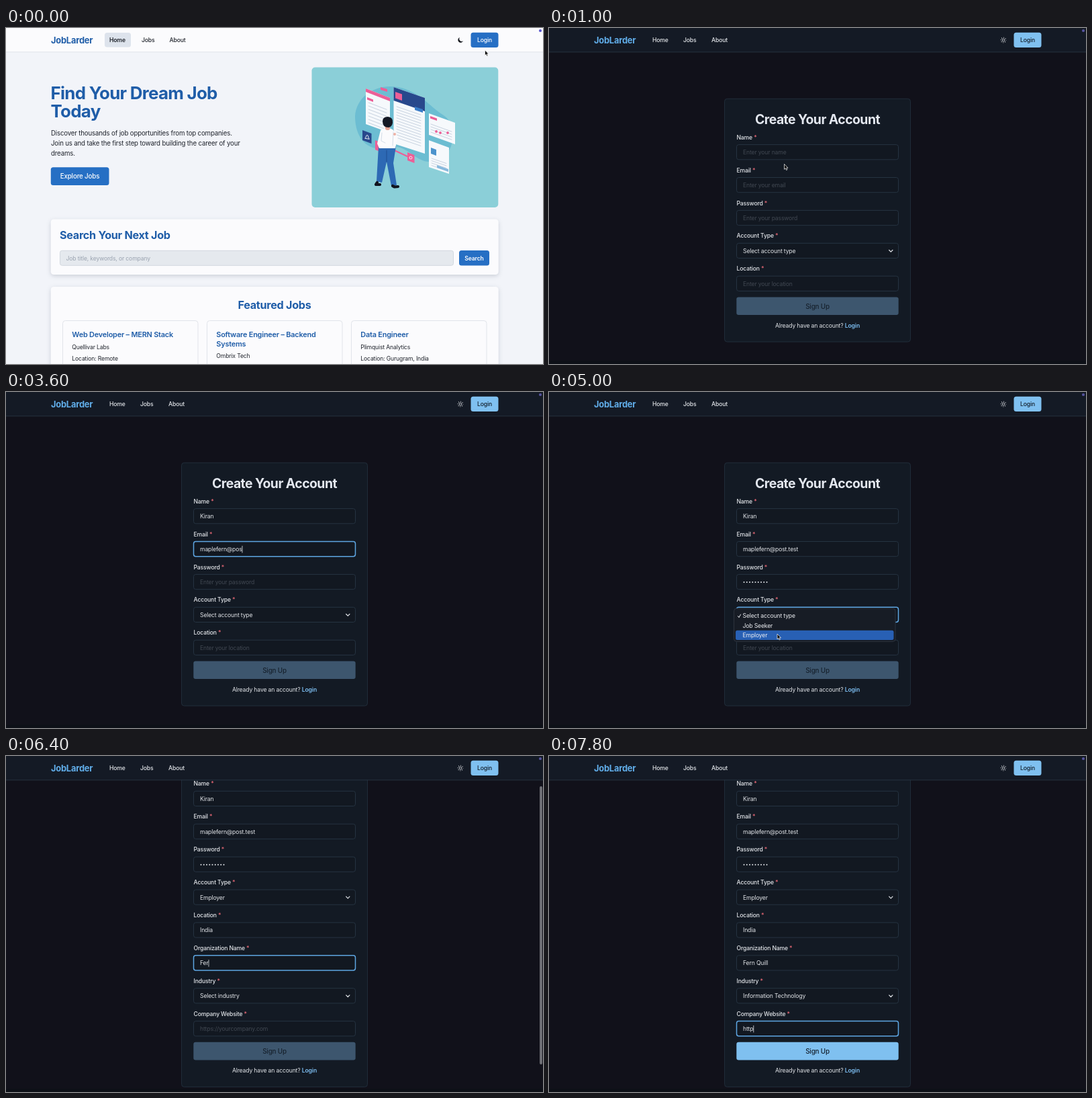
Recreate the animation shown at these times as an HTML page. Size 800 px wide and 500 px high, loop 8000 ms.

```html
<!DOCTYPE html>
<html lang="en">
<head>
<meta charset="utf-8">
<title>Job board sign-up</title>
<style>
html, body { margin: 0; width: 100%; height: 100%; overflow: hidden; }
svg { display: block; width: 800px; height: 500px; font-family: Inter, "Open Sans", sans-serif; }
.light {
  --bg: #f2f4f9; --panel: #fbfbfd; --line: #e1e4ea; --ink: #20242c; --title: #1f2430; --hint: #767b84;
  --brand: #1f5da8; --link: #1f6bbd; --button: #266fc4; --on: #fff; --off: #a3c1e2; --off-ink: #f5f8fc;
  --star: #dc3f5b; --field: #fbfbfd; --dot: #5a58d0;
}
.dark {
  --bg: #11111a; --panel: #131a24; --line: #253341; --ink: #e2e5e9; --title: #e4e8f0; --hint: #414852;
  --brand: #61aeea; --link: #7cbdf0; --button: #7fc0f0; --on: #14202d; --off: #3d566e; --off-ink: #17222e;
  --star: #ef6b78; --field: #121821; --dot: #57549f;
}
.light .raised { filter: drop-shadow(0 2px 3px #20304a30); }
</style>
</head>
<body>
<svg id="stage" viewBox="0 0 800 500"></svg>
<script>
const stage = document.getElementById('stage');
const LOOP = 8000, STEP = 200, PITCH = 48.9;
const BRAND = 'JobLarder';

const rect = (x, y, w, h, fill, r = 0, extra = '') =>
  `<rect x="${x}" y="${y}" width="${w}" height="${h}" rx="${r}" fill="${fill}" ${extra}/>`;
const poly = (points, fill, extra = '') => `<polygon points="${points}" fill="${fill}" ${extra}/>`;
const stroke = (d, color, width = 1) =>
  `<path d="${d}" fill="none" stroke="${color}" stroke-width="${width}" stroke-linecap="round" stroke-linejoin="round"/>`;

// y is the middle of the capital letters
function text(x, y, content, { size = 8.63, weight = 400, fill = 'var(--ink)', anchor = 'start', extra = '' } = {}) {
  const spacing = size * (size > 18 ? -0.028 : -0.018);
  return `<text x="${x}" y="${y + size * 0.364}" font-size="${size}" font-weight="${weight}" fill="${fill}"
    letter-spacing="${spacing}" text-anchor="${anchor}" ${extra}>${content}</text>`;
}

const typed = (word, start, end, t) =>
  word.slice(0, Math.round(word.length * Math.min(1, Math.max(0, (t - start) / (end - start)))));

function nav(home, dark) {
  const items = home ? [['Home', 154], ['Jobs', 202], ['About', 243.5]] : [['Home', 154], ['Jobs', 200], ['About', 242]];
  const icon = dark
    ? `<circle cx="677" cy="18" r="1.8" fill="none" stroke="var(--ink)" stroke-width=".8"/>
       <circle cx="677" cy="18" r="3.7" fill="none" stroke="var(--ink)" stroke-width="1.3" stroke-dasharray=".9 2.006" stroke-dashoffset=".45"/>`
    : '<path d="M676 14a4 4 0 1 0 5 5.3a3.7 3.7 0 0 1-5-5.3z" fill="#11141a"/>';
  return rect(0, 0, 800, 35.5, dark ? '#141a25' : 'var(--panel)') + rect(0, 35.3, 800, 1, 'var(--line)')
    + text(67, 18, BRAND, { size: 12.9, weight: 700, fill: 'var(--brand)' })
    + (home ? rect(147, 7, 39, 21.5, '#dde3ec', 3.5) : '')
    + items.map(([label, x], i) => text(x, 18, label, { weight: home && !i ? 600 : 500 })).join('')
    + icon + rect(692.5, 6.8, 41, 22.2, 'var(--button)', 3.5)
    + text(713, 18, 'Login', { weight: 500, fill: 'var(--on)', anchor: 'middle' })
    + '<circle cx="796" cy="4" r="2.1" fill="var(--dot)"/>';
}

function ruled(x, y, width, slope, count, gap, color = '#bcc8d8') {
  let d = '';
  for (let i = 0; i < count; i++) d += `M${x} ${y + i * gap}l${width} ${width * slope}`;
  return stroke(d, color, 0.8);
}

function illustration() {
  const pink = '#ec5f97', navy = '#28488c', white = '#f6f9fc';
  return rect(455.5, 58.5, 277.8, 208.5, '#8bcfd8', 5)
    + '<path d="M520 131C522 101 552 82 584 88S630 116 652 130S670 190 640 198S600 170 570 178S520 165 520 131z" fill="#6cbdd2"/>'
    + poly('536,90 572,104 572,156 536,143', white) + poly('536,90 572,104 572,109 536,95', pink)
    + ruled(540, 111, 27, 0.38, 7, 5) + poly('538,103 547,106.500 547,110 538,106.500', pink)
    + poly('558,88 568,91 568,95 558,92', pink)
    + poly('577.500,88 624,104 624,187 577.500,172', white) + poly('577.500,88 624,104 624,124 577.500,108', navy)
    + poly('580,95 590,98.500 590,108 580,104.500', pink) + poly('609,117 621,121 621,126 609,122', '#397cc8')
    + ruled(582, 117, 36, 0.34, 12, 4.2)
    + poly('630,127 669,141 669,173 630,159', white) + poly('632,131 642,134.500 642,138 632,134.500', pink)
    + ruled(633, 143, 31, 0.36, 4, 4)
    + [[641, 154], [647, 156], [658, 156]].map(([x, y]) => `<circle cx="${x}" cy="${y}" r="1.9" fill="${pink}"/>`).join('')
    + poly('630,167 660,178 660,217 630,207', white) + poly('633,178 641,181 641,190 633,187', '#4c93cc')
    + ruled(634, 194, 22, 0.34, 4, 3.5) + poly('642,204 659,210 659,214 642,208', '#87b9dd')
    + poly('531,152 544.500,157 544.500,172 531,167', navy)
    + stroke('M535 164q1.500-1 1.500-3q1.500-3.500 3 0q0 2 1.500 4z', '#fff', 0.9)
    + stroke('M570 178l30 14', pink, 2) + poly('598,185 608.500,189 608.500,201 598,197', pink)
    + `<circle cx="603" cy="193" r="2" fill="none" stroke="#fff" stroke-width=".8"/>`
    + poly('550,167 557,170 557,184 550,181', pink)
    + poly('555,176 581,176 577,201 582,234 574,235 567,199 560,230 552,228', '#2d69b4')
    + stroke('M567 182v17', '#204f91', 1)
    + '<path d="M558 152Q567 146 576 151L584 162L581 174L580 179H556L553 172z" fill="#fbfbfd"/>'
    + stroke('M560 156l-1 12l6 3M577 155l-1 20', '#c9d5e3', 0.8)
    + '<circle cx="579" cy="158" r="2" fill="#edb0a3"/><rect x="565" y="143" width="7" height="9" rx="3" fill="#e4a394"/>'
    + '<path d="M561 139q0-7 8-7q8 1 7 9q-1 6-6 7q-9 0-9-9z" fill="#141824"/>'
    + stroke('M553 230l-2 3h6M576 235l3 1.500l5-.5', '#11141f', 4.2);
}

function homePage() {
  const heading = (x, y, label, size, extra) => text(x, y, label, { size, weight: 700, fill: 'var(--brand)', ...extra });
  const jobs = [
    [['Web Developer – MERN Stack'], 'Quellivar Labs', 'Location: Remote'],
    [['Software Engineer – Backend', 'Systems'], 'Ombrix Tech', ''],
    [['Data Engineer'], 'Plimquist Analytics', 'Location: Gurugram, India'],
  ];
  const copy = ['Discover thousands of job opportunities from top companies.',
    'Join us and take the first step toward building the career of your', 'dreams.'];
  const cards = jobs.map(([title, company, place], i) => {
    const x = 84 + 215 * i, last = 456.5 + 13 * (title.length - 1);
    return rect(x + 0.5, 435.5, 201.5, 90, 'var(--panel)', 4, 'stroke="var(--line)"')
      + title.map((line, n) => heading(x + 14.3, 456.5 + 13.3 * n, line, 10.9, { weight: 600 })).join('')
      + text(x + 14.3, last + 18, company) + text(x + 14.3, last + 35.5, place);
  }).join('');
  return heading(66.5, 97, 'Find Your Dream Job', 25.9) + heading(66.5, 123.5, 'Today', 25.9)
    + copy.map((line, i) => text(67, 156.5 + 15 * i, line, { size: 9.7 })).join('')
    + rect(66.8, 207.3, 86.7, 26.7, 'var(--button)', 3.5)
    + text(110, 220.8, 'Explore Jobs', { size: 9.8, weight: 500, fill: '#fff', anchor: 'middle' })
    + illustration()
    + rect(66.7, 284.5, 667, 82.5, 'var(--panel)', 4.5, 'class="raised"') + heading(80, 308.5, 'Search Your Next Job', 16.2)
    + rect(80.5, 331.3, 586, 22, '#e5e9ee', 3, 'stroke="#d2d8df"')
    + text(89.5, 342.5, 'Job title, keywords, or company', { fill: '#9aa3b0' })
    + rect(675, 331, 45, 22.5, 'var(--button)', 3.5)
    + text(697.5, 342.5, 'Search', { weight: 600, fill: '#fff', anchor: 'middle' })
    + rect(66.7, 385, 667, 130, 'var(--panel)', 4.5, 'class="raised"')
    + heading(400, 412.5, 'Featured Jobs', 16.2, { anchor: 'middle' }) + cards;
}

function field({ label, hint, value, kind }, i, focused) {
  const y = 184.8 + PITCH * i;
  const box = rect(279.5, y - 11.2, 241, 22.2, 'var(--field)', 3.2,
    focused ? 'stroke="#5ea6e2" stroke-width="1.5"' : 'stroke="var(--line)"');
  let content;
  if (kind === 'password' && value) {
    content = [...value].map((_, n) => `<circle cx="${290.5 + 4.25 * n}" cy="${y + 0.5}" r="1" fill="var(--ink)"/>`).join('');
    if (focused) content += rect(289.4 + 4.25 * value.length, y - 5, 0.8, 10, 'var(--ink)');
  } else {
    content = text(289, y + 0.2, value || hint, {
      fill: value || kind === 'select' ? 'var(--ink)' : 'var(--hint)',
      extra: focused && kind !== 'select' ? `data-caret="${value.length}"` : '',
    });
  }
  if (kind === 'select') content += stroke(`M506.700 ${y - 1}l2.600 2.600l2.600-2.600`, 'var(--ink)', 1.2);
  return text(279.5, y - 22.2, `${label} <tspan fill="var(--star)">*</tspan>`, { weight: 500 }) + box + content;
}

function menu(options, y, active) {
  const rows = options.map((option, i) => {
    const rowY = y + 14.45 * i;
    return (i === active ? rect(278, rowY - 7.2, 235.5, 14.4, '#2860b4', 2.5) : '')
      + text(288.5, rowY + 0.2, option, { fill: '#eceef2' })
      + (i ? '' : stroke(`M281.500 ${rowY + 0.5}l1.500 2l2.500-4.500`, '#eceef2', 1));
  }).join('');
  return rect(275.5, y - 11, 240.5, options.length * 14.45 + 6, '#171c25', 4, 'stroke="#343a44" stroke-width=".8"') + rows;
}

const industries = ['Select industry', 'Information Technology', 'Finance', 'Healthcare', 'Education',
  'Retail', 'Manufacturing', 'Consulting', 'Other'];
const roles = ['Select account type', 'Job Seeker', 'Employer'];
const focusStarts = [2000, 2800, 4200, 5000, 5800, 6400, 6800, 7600];

function signUpPage(t) {
  const focus = focusStarts.filter(start => t >= start).length - 1;
  const employer = t >= 5200;
  const scroll = t >= 5600 ? 121.3 : t >= 5400 ? 80 : 0;
  const website = typed('http', 7400, 7800, t);
  const fields = [
    { label: 'Name', hint: 'Enter your name', value: typed('Kiran', 2000, 2600, t) },
    { label: 'Email', hint: 'Enter your email', value: typed('maplefern@post.test', 2800, 3969, t) },
    { label: 'Password', hint: 'Enter your password', value: typed('*********', 4200, 4800, t), kind: 'password' },
    { label: 'Account Type', hint: roles[0], value: employer ? roles[2] : '', kind: 'select' },
    { label: 'Location', hint: 'Enter your location', value: typed('India', 5800, 6200, t) },
    { label: 'Organization Name', hint: 'Enter your organization name', value: typed('Fern Quill', 6200, 6800, t) },
    { label: 'Industry', hint: industries[0], value: t >= 7400 ? industries[1] : '', kind: 'select' },
    { label: 'Company Website', hint: 'https://yourcompany.com', value: website },
  ].slice(0, employer ? 8 : 5);
  const extra = PITCH * (fields.length - 5);
  const ready = website.length > 0;
  const form = rect(261.5, 105.3, 277, 361.7 + extra, 'var(--panel)', 4, 'class="raised" stroke="var(--line)" stroke-width=".8"')
    + text(400, 136, 'Create Your Account', { size: 19.4, weight: 700, fill: 'var(--title)', anchor: 'middle' })
    + fields.map((item, i) => field(item, i, i === focus)).join('')
    + rect(279.3, 400.4 + extra, 241.4, 26.6, ready ? 'var(--button)' : 'var(--off)', 3.2)
    + text(400, 414 + extra, 'Sign Up', { size: 9.9, weight: 500, fill: ready ? 'var(--on)' : 'var(--off-ink)', anchor: 'middle' })
    + text(400, 442.8 + extra, 'Already have an account? <tspan font-weight="600" fill="var(--link)">Login</tspan>', { anchor: 'middle' });
  let overlay = '';
  if (t === 5000) overlay = menu(roles, 333, 2);
  if (t === 7000 || t === 7200) overlay = menu(industries, 358, t === 7000 ? 0 : 1);
  if (t >= 5200 && t < 6600) overlay += rect(795, 45 - (121.3 - scroll) * 0.3, 4, 414, '#6d6e74', 2);
  return { form: `<g transform="translate(0 ${-scroll})">${form}</g>`, overlay };
}

const pointerStops = [
  [0, 713.5, 33], [200, 712, 18, 'hand'], [400, 712, 18, 'hand'], [600, 696, 24], [800, 678, 25.5, 'hand'],
  [1000, 350.5, 202.5], [1200, 300, 181], [1400, 520, 457], [1600, 420, 325], [2000, -20, -20],
  [4800, 450, 329], [5000, 340, 360], [5400, 375.5, 273], [5800, -20, -20], [6800, 358, 353],
  [7200, 358, 370], [7600, -20, -20],
];

function pointer(t) {
  const [, x, y, kind] = pointerStops.filter(([start]) => t >= start).pop();
  const shape = kind === 'hand'
    ? '<path d="M-1 5V1.500Q0 .4 1 1.500V4Q5 3.600 5.200 5.500Q5 8.500 3.500 10H0Q-1 8-3 6Q-2.500 4.600-1 5z" fill="#fff" stroke="#111" stroke-width=".9"/>'
    : '<path d="M0 0V7.800L1.800 6.200L3 9L4.400 8.400L3.200 5.700H5.500z" fill="#080808" stroke="#fff" stroke-width=".7"/>';
  return `<g transform="translate(${x} ${y})">${shape}</g>`;
}

function addCaret() {
  const target = stage.querySelector('[data-caret]');
  if (!target) return;
  const width = target.dataset.caret > 0 ? target.getComputedTextLength() : 0;
  const x = +target.getAttribute('x') + width, y = +target.getAttribute('y') - 8.2;
  target.insertAdjacentHTML('afterend', rect(x, y, 0.8, 10.5, 'var(--ink)'));
}

function draw(t) {
  const home = t < 400, dark = t >= 1000;
  const page = home ? { form: homePage(), overlay: '' } : signUpPage(t);
  stage.setAttribute('class', dark ? 'dark' : 'light');
  stage.innerHTML = rect(0, 0, 800, 500, 'var(--bg)')
    + (dark ? rect(0, 495.5, 800, 4.5, '#0d1017') : '')
    + page.form + nav(home, dark) + page.overlay + pointer(t);
  addCaret();
}

let shown = -1;
function tick(now) {
  const t = Math.floor((now % LOOP) / STEP) * STEP;
  if (t !== shown) draw(shown = t);
  requestAnimationFrame(tick);
}
draw(0);
requestAnimationFrame(tick);
</script>
</body>
</html>
```
